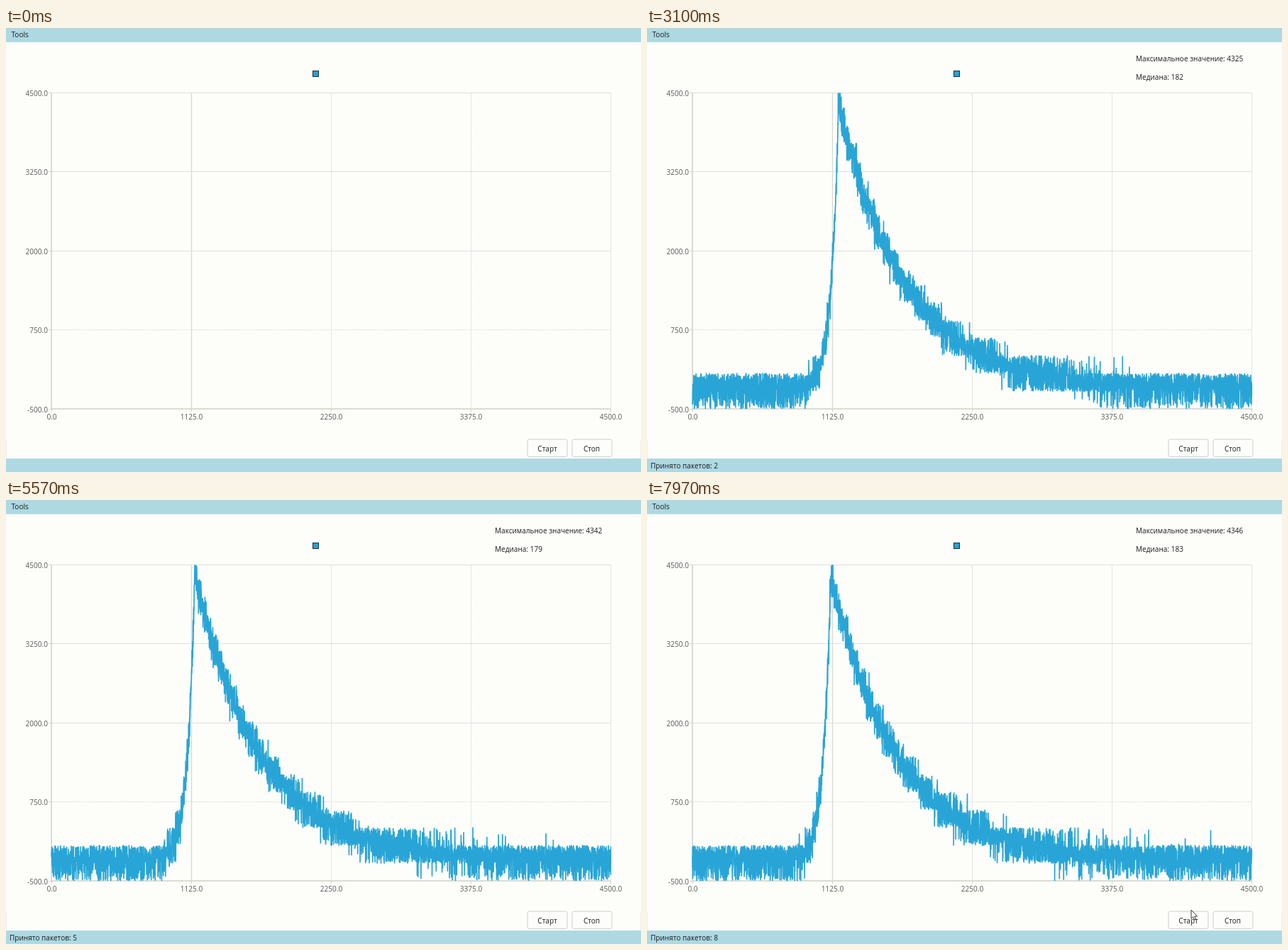
An HTML page that plays this animation: 895x626 px, repeating every 8000 ms.

```html
<!DOCTYPE html>
<html lang="ru">
<head>
<meta charset="utf-8">
<style>
  html, body { margin: 0; width: 100%; height: 100%; overflow: hidden; background: #fdfdfa; }
  svg { display: block; }
  text { font: 10.05px "Open Sans", "Noto Sans", sans-serif; fill: #1c1c1c; }
  .axis text { fill: #5a5a58; }
  .mid { text-anchor: middle; }
  .end { text-anchor: end; }
  .button rect { fill: #fdfdfb; stroke: #cdcfcb; }
  .button.hot rect { fill: #d9ebf4; stroke: #459cc9; }
</style>
</head>
<body>
<svg id="stage" width="895" height="626" viewBox="0 0 895 626">
  <defs><clipPath id="plot"><rect x="63" y="91.5" width="790.5" height="445.5"/></clipPath></defs>
  <rect width="895" height="626" fill="#fdfdfa"/>
  <rect width="895" height="20" fill="#aed9e3"/>
  <rect y="607" width="895" height="19" fill="#aed9e3"/>
  <path d="M.5 581V607M894.5 581V607" stroke="#eeefeb"/>
  <text x="7.5" y="13">Tools</text>
  <g id="axis" class="axis"></g>
  <path id="trace" fill="none" stroke="#28a5d6" stroke-width="1.7" stroke-linejoin="round" clip-path="url(#plot)"/>
  <rect x="432.5" y="60.5" width="8" height="8" fill="#2a9fd0" stroke="#17303b"/>
  <text id="max" x="689" y="46.5"></text>
  <text id="median" x="689" y="73"></text>
  <g id="start" class="button"><rect x="735" y="580" width="56" height="24.5" rx="2.5"/><text class="mid" x="763" y="596.5">Старт</text></g>
  <g id="stop" class="button"><rect x="798" y="580" width="56" height="24.5" rx="2.5"/><text class="mid" x="825.5" y="596.5">Стоп</text></g>
  <text id="status" x="5" y="621"></text>
  <path id="cursor" d="M0 0V12.2L2.7 9.7L4.6 13.8L6.6 12.9L4.8 8.9H8.6Z" fill="#fff" stroke="#222" stroke-width=".9"/>
</svg>
<script>
const LOOP = 8000;
const LEFT = 64, RIGHT = 852.5, TOP = 91.5, BOTTOM = 537;
const SAMPLES = 4500, STEP = 25, FLOOR = 487;
const $ = id => document.getElementById(id);

// Each packet: arrival in ms, x of the peak, maximum, median
const packets = [
  [1600, 272.5, 4310, 183], [2400, 270, 4325, 182], [3200, 268, 4301, 182], [4050, 267, 4318, 181],
  [4850, 266, 4342, 179], [5650, 264, 4296, 181], [6440, 261.5, 4187, 183], [7250, 259, 4346, 183]
];

// Cursor visits: keys of time, x, y
const visits = [
  [[150, 660, 2], [550, 757, 594], [1000, 757, 594], [1400, 775, 626]],
  [[5950, 835, 626], [6300, 808, 586], [7000, 808, 586], [7600, 767, 578], [LOOP, 767, 578]]
];

function drawAxis() {
  const line = (d, color, width = 1, dash = 'none') =>
    `<path d="${d}" stroke="${color}" stroke-width="${width}" stroke-dasharray="${dash}" fill="none"/>`;
  const crisp = v => Math.floor(v) + 0.5;
  let out = '';
  for (let i = 0; i <= 4; i++) {
    const x = crisp(LEFT + (RIGHT - LEFT) * i / 4);
    const y = crisp(TOP + (BOTTOM - TOP) * i / 4);
    if (i > 0) {
      out += i === 1 ? line(`M${x} ${TOP}V${BOTTOM}`, '#d6dad0', 1.3)
                     : line(`M${x} ${TOP}V${BOTTOM}`, '#d9dbdc', 1, '2 1');
    }
    if (i < 4) out += line(`M${LEFT} ${y}H${RIGHT}`, '#dfe1df', 1, i === 3 ? '2 1' : 'none');
    out += line(`M${x} ${BOTTOM}v4M${LEFT} ${y}h-4`, '#d0d4c8');
    out += `<text class="end" x="59" y="${y + 4}">${(4500 - 1250 * i).toFixed(1)}</text>`;
    out += `<text class="mid" x="${x}" y="552">${(1125 * i).toFixed(1)}</text>`;
  }
  out += line(`M${LEFT} ${TOP}V${BOTTOM}H${RIGHT}`, '#d0d4c8', 1.6);
  $('axis').innerHTML = out;
}

function random(seed) {
  return () => {
    seed = (seed + 0x6D2B79F5) | 0;
    let t = Math.imul(seed ^ (seed >>> 15), 1 | seed);
    t = (t + Math.imul(t ^ (t >>> 7), 61 | t)) ^ t;
    return ((t ^ (t >>> 14)) >>> 0) / 4294967296;
  };
}

// Steep rise, slow decay, coarse quantising plus fine noise
function tracePath(seed, peak) {
  const rnd = random(seed);
  let d = '';
  for (let i = 0; i <= SAMPLES; i++) {
    const x = LEFT + (RIGHT - LEFT) * i / SAMPLES;
    const dx = x - peak;
    const pulse = 402 * Math.exp(dx < 0 ? dx / 10.5 : -dx / 94);
    const centre = 508.5 - pulse + 21.5 * (rnd() + rnd() - 1);
    const level = Math.floor((centre - FLOOR) / STEP);
    const y = FLOOR + STEP * (level + rnd());
    d += (i ? 'L' : 'M') + x.toFixed(2) + ' ' + y.toFixed(1);
  }
  return d;
}

const traces = packets.map((p, i) => tracePath(i * 97 + 5, p[1]));
let shown = -1;

function showPacket(n) {
  if (n === shown) return;
  shown = n;
  const p = packets[n - 1];
  $('trace').setAttribute('d', p ? traces[n - 1] : '');
  $('max').textContent = p ? `Максимальное значение: ${p[2]}` : '';
  $('median').textContent = p ? `Медиана: ${p[3]}` : '';
  $('status').textContent = p ? `Принято пакетов: ${n}` : '';
}

function cursorAt(t) {
  const keys = visits.find(v => t >= v[0][0] && t < v[v.length - 1][0]);
  if (!keys) return null;
  const i = keys.findIndex(k => k[0] > t);
  const a = keys[i - 1], b = keys[i];
  const u = (t - a[0]) / (b[0] - a[0]);
  const e = u * u * (3 - 2 * u);
  return [a[1] + (b[1] - a[1]) * e, a[2] + (b[2] - a[2]) * e];
}

function render(t) {
  showPacket(packets.filter(p => t >= p[0]).length);
  const c = cursorAt(t);
  $('cursor').style.display = c ? '' : 'none';
  if (c) $('cursor').setAttribute('transform', `translate(${c[0]} ${c[1]})`);
  const over = x => !!c && c[0] >= x && c[0] <= x + 56 && c[1] >= 580 && c[1] <= 604.5;
  $('start').classList.toggle('hot', over(735));
  $('stop').classList.toggle('hot', over(798));
}

drawAxis();
render(0);
const began = performance.now();
function tick() {
  render((performance.now() - began) % LOOP);
  requestAnimationFrame(tick);
}
requestAnimationFrame(tick);
</script>
</body>
</html>
```
